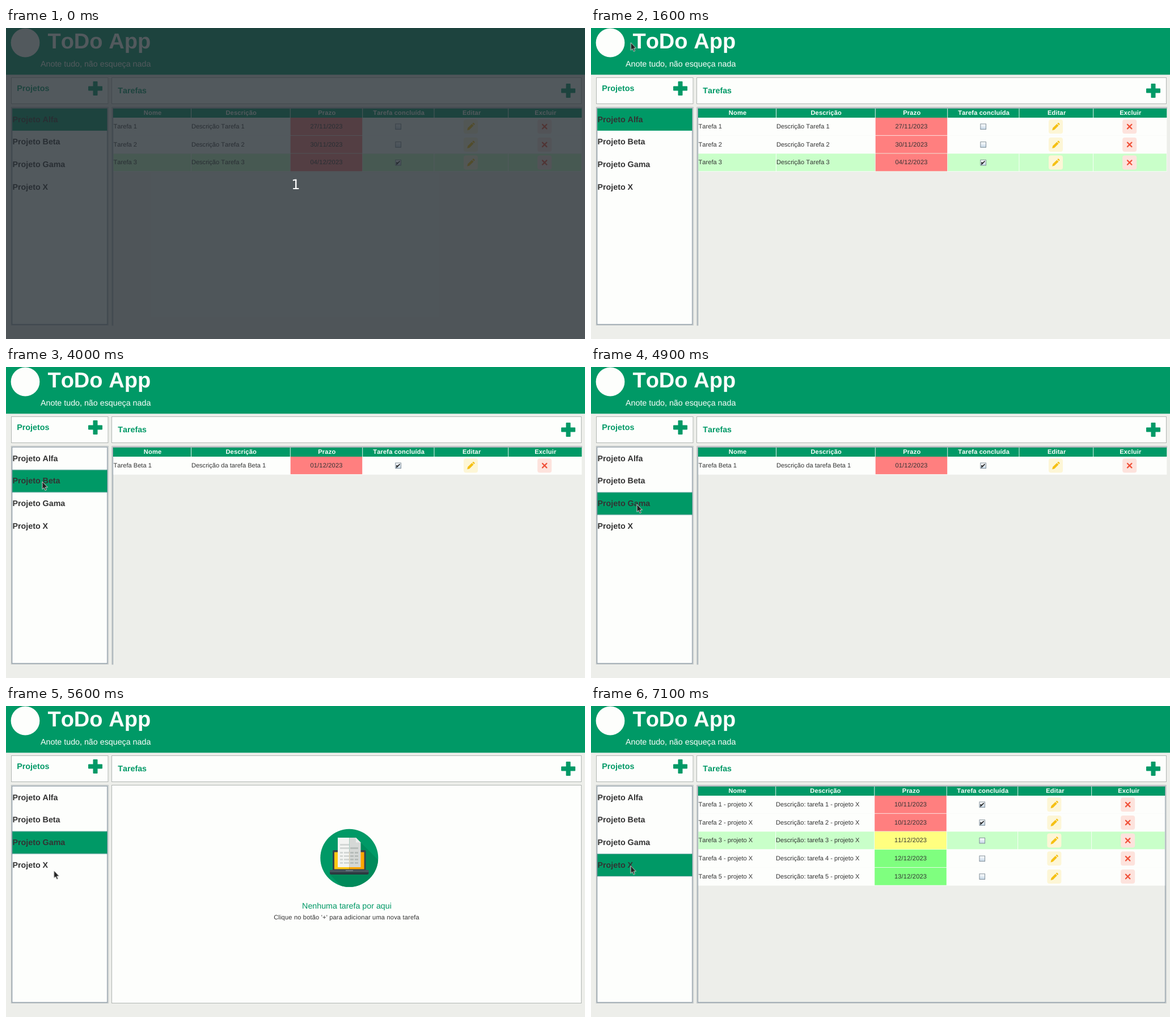
Write an HTML page that moves like this. It is 1021x548 px and loops after 8 s.

```html
<!DOCTYPE html>
<html lang="pt">
<head>
<meta charset="utf-8">
<title>Lista de tarefas</title>
<style>
  html, body { margin: 0; width: 100%; height: 100%; overflow: hidden; background: #edeeea; }
  svg { display: block; width: 1021px; height: 548px; }
  text {
    font-family: "Liberation Sans", Arial, sans-serif;
    font-size: 11.1px; fill: #333;
    font-kerning: none; text-rendering: geometricPrecision;
  }
  .big { font-size: 14.27px; }
  .bold { font-weight: bold; }
  .mid { text-anchor: middle; }
  .wide { letter-spacing: .17px; }
  .green { fill: #009966; }
  .white { fill: #fdfefc; }
  .panel { fill: #fdfefc; stroke: #b1b6b3; }
  .outer { fill: none; stroke: #b9bfc0; }
  .inner { fill: none; stroke: #7a8a99; }

  .scene, #veil, #cursor, #selection { animation: 8s step-end infinite; }
  #alfa { animation-name: alfa; }
  #beta { animation-name: beta; }
  #empty { animation-name: empty; }
  #xis { animation-name: xis; }
  #veil { animation-name: veil; }
  #selection { animation-name: select; }
  #cursor { animation-name: point; }

  @keyframes alfa { 0% { visibility: visible } 40%, 100% { visibility: hidden } }
  @keyframes beta { 0% { visibility: hidden } 40% { visibility: visible } 62.5%, 100% { visibility: hidden } }
  @keyframes empty { 0% { visibility: hidden } 62.5% { visibility: visible } 88.75%, 100% { visibility: hidden } }
  @keyframes xis { 0% { visibility: hidden } 88.75%, 100% { visibility: visible } }
  @keyframes veil { 0% { visibility: visible } 1.25%, 100% { visibility: hidden } }
  @keyframes select {
    0% { transform: translateY(0); stroke: none }
    38.75% { transform: translateY(39.65px); stroke: #3c8b86 }
    61.25% { transform: translateY(79.3px); stroke: #3c8b86 }
    87.5%, 100% { transform: translateY(118.95px); stroke: #3c8b86 }
  }
  /* The pointer advances once every 100 ms */
  @keyframes point {
    0% { transform: translate(74px, -30px) }
    18.75% { transform: translate(74px, 1px); animation-timing-function: steps(4) }
    23.75% { transform: translate(59px, 100px); animation-timing-function: steps(2) }
    26.25% { transform: translate(50px, 160px); animation-timing-function: steps(2) }
    28.75% { transform: translate(53px, 187px); animation-timing-function: steps(5) }
    35%, 48.75% { transform: translate(63px, 200px) }
    50% { transform: translate(64px, 202px); animation-timing-function: steps(4) }
    55% { transform: translate(81px, 242px) }
    62.5% { transform: translate(81px, 242px); animation-timing-function: steps(6) }
    70%, 72.5% { transform: translate(84.5px, 290px) }
    73.75% { transform: translate(71px, 285px) }
    80% { transform: translate(71px, 285px); animation-timing-function: steps(2) }
    82.5%, 100% { transform: translate(70px, 281.5px) }
  }
</style>
</head>
<body>
<svg viewBox="0 0 1021 548">
  <defs>
    <linearGradient id="boxFill" x2="0" y2="1">
      <stop offset="0" stop-color="#fff"/><stop offset="1" stop-color="#c4d6e6"/>
    </linearGradient>
    <clipPath id="disc"><circle cx="605.3" cy="267.8" r="51"/></clipPath>
    <path id="plus" class="green" d="M-3 -12.5h6q1 0 1 1v7.5h7.5q1 0 1 1v6q0 1 -1 1h-7.5v7.5q0 1 -1 1h-6q-1 0 -1 -1v-7.5h-7.5q-1 0 -1 -1v-6q0 -1 1 -1h7.5v-7.5q0 -1 1 -1z"/>
    <rect id="box" x="-4.9" y="-4.7" width="9.6" height="9.6" fill="url(#boxFill)" stroke="#75848f" stroke-width=".9"/>
    <path id="tick" d="M-2.6 -.8V2.6L2.8 -2.6" fill="none" stroke="#222" stroke-width="1.7"/>
    <g id="edit">
      <rect x="-12.5" y="-12.5" width="25" height="25" rx="4" fill="#fdf6d6"/>
      <path d="M-6.3 6.6l1 -4.2L2 -4.7L5 -1.7L-2.2 5.5zM2.8 -5.5l1 -1q.7 -.6 1.4 0l1.6 1.6q.6 .7 0 1.4l-1 1z" fill="#f5c014"/>
    </g>
    <g id="drop">
      <rect x="-12.5" y="-12.5" width="25" height="25" rx="4" fill="#fde3dd"/>
      <path d="M-3.7 -3.7L3.7 3.7M3.7 -3.7L-3.7 3.7" stroke="#f0523a" stroke-width="2.3" stroke-linecap="round"/>
    </g>
  </defs>

  <rect width="1021" height="548" fill="#edeeea"/>
  <rect width="1021" height="82.3" class="green"/>
  <circle cx="34" cy="26" r="25.4" class="white"/>
  <text x="73.4" y="36" class="bold white" style="font-size:38.06px">ToDo App</text>
  <text x="61" y="68" class="big white">Anote tudo, não esqueça nada</text>

  <rect x="9.5" y="87.5" width="170.5" height="46" class="panel"/>
  <rect x="186.5" y="87.5" width="828" height="46" class="panel"/>
  <text x="19.3" y="111" class="big bold green">Projetos</text>
  <text x="197.3" y="115" class="big bold green">Tarefas</text>
  <use href="#plus" x="157.5" y="106.5"/>
  <use href="#plus" x="991.5" y="110.5"/>

  <rect x="9.3" y="139.5" width="171" height="384" class="outer"/>
  <rect x="10.7" y="141.2" width="168" height="381" class="inner white" style="fill:#fdfefc"/>
  <rect id="selection" x="11.2" y="141.9" width="167.2" height="39" class="green" stroke-width=".8"/>
  <g id="projects"></g>

  <g id="alfa" class="scene"></g>
  <g id="beta" class="scene"></g>
  <g id="xis" class="scene"></g>
  <g id="empty" class="scene">
    <rect x="186.5" y="139.5" width="828" height="384" class="panel"/>
    <circle cx="605.3" cy="267.8" r="51" class="green"/>
    <path clip-path="url(#disc)" d="M625 240L665 280V330H604L571 297z" fill="#008a5a"/>
    <path d="M576 256q0 -2 2 -2h54.500q2 0 2 2v34h-58.500z" fill="#35424b"/>
    <path d="M579 257.500h26.300v30h-26.300z" fill="#ffc714"/>
    <path d="M605.300 257.500h26.300v30h-26.300z" fill="#fba600"/>
    <path d="M585 232h20.300v52h-20.300z" fill="#f3f4f2"/>
    <path d="M605.300 232h11.700l8.500 8.500v43.500h-20.200z" fill="#d5d8d6"/>
    <path d="M617 232l8.500 8.500h-8.500z" fill="#eceeec"/>
    <path d="M589 244.500h16M589 250.500h16M589 258.500h5M596 258.500h9M589 264.500h5M596 264.500h9M589 270.500h5M596 270.500h9M589 276.500h5M596 276.500h9" stroke="#d3d7d5" stroke-width="3"/>
    <path d="M607 250.500h14M607 258.500h6M615 258.500h6M607 264.500h6M615 264.500h6M607 270.500h6M615 270.500h6M607 276.500h6M615 276.500h6" stroke="#b6bcb9" stroke-width="3"/>
    <path d="M571 289h68.500v5q0 3 -3 3h-62.500q-3 0 -3 -3z" fill="#45545d"/>
    <path d="M571 293h68.500v1q0 3 -3 3h-62.500q-3 0 -3 -3z" fill="#2c3940"/>
    <path d="M599 289h13v2h-13z" fill="#6c7a82"/>
    <text x="601" y="357" class="big mid green">Nenhuma tarefa por aqui</text>
    <text x="600.5" y="376" class="mid wide">Clique no botão '+' para adicionar uma nova tarefa</text>
  </g>

  <path id="cursor" d="M0 0V13.400L3 10.700L5.100 15.600L7.300 14.600L5.300 9.900H9.400z" fill="#222" stroke="#f4f5f3" stroke-width=".8"/>

  <g id="veil">
    <rect width="1021" height="548" fill="rgba(37,45,51,.79)"/>
    <text x="511" y="283.500" class="mid" style="font:24px 'DejaVu Sans',sans-serif;fill:#fff">1</text>
  </g>
</svg>
<script>
  const ROW = 31.7, TOP = 158;
  const RED = '#ff7f7f', YELLOW = '#ffff7f', LIME = '#7fff7f';
  const headings = ['Nome', 'Descrição', 'Prazo', 'Tarefa concluída', 'Editar', 'Excluir'];
  const byId = id => document.getElementById(id);
  const text = (x, y, cls, s) => `<text x="${x}" y="${y}" class="${cls}">${s}</text>`;
  const rect = (x, y, w, h, fill) => `<rect x="${x}" y="${y}" width="${w}" height="${h}" fill="${fill}"/>`;
  const use = (id, x, y) => `<use href="#${id}" x="${x}" y="${y}"/>`;

  byId('projects').innerHTML = ['Alfa', 'Beta', 'Gama', 'X']
    .map((name, i) => text(11.5, 165.7 + i * 39.65, 'big bold', 'Projeto ' + name)).join('');

  function drawRow([name, description, date, color, done], i, edges, mids) {
    const y = TOP + i * ROW, middle = y + 15.7, base = y + 19;
    return rect(189, y, edges[6] - 189, ROW, '#fdfefc') +
      (i === 2 ? edges.slice(0, 6).map((x, c) =>
        rect(x + .4, y, edges[c + 1] - x - .9, ROW - .8, '#c9ffc9')).join('') : '') +
      rect(edges[2] + .4, y, edges[3] - edges[2] - .9, ROW - .8, color) +
      text(189.6, base, '', name) +
      text(edges[1] + .4, base, '', description) +
      text(mids[2], base, 'mid wide', date) +
      use('box', mids[3] - .1, middle) + (done ? use('tick', mids[3] - .1, middle) : '') +
      use('edit', mids[4] - .8, middle) +
      use('drop', mids[5] - .8, middle);
  }

  function drawTable(id, edges, rows, framed) {
    const mids = headings.map((_, c) => (edges[c] + edges[c + 1]) / 2);
    const frame = framed
      ? '<rect x="186.7" y="139.5" width="827.5" height="384" class="outer"/><rect x="188.3" y="141.2" width="824.4" height="381" class="inner"/>'
      : '<path d="M1016 139.500H186.700V524.500" class="outer"/><path d="M1016 141.200H188.300V524.500" class="inner"/>';
    byId(id).innerHTML = frame +
      rect(189, 142, edges[6] - 189, 16, '#009966') +
      edges.slice(1, 6).map(x => rect(x - .5, 142, 1, 16, '#e4f3ec')).join('') +
      headings.map((s, c) => text(mids[c] + .8, 153, 'bold mid wide white', s)).join('') +
      rows.map((row, i) => drawRow(row, i, edges, mids)).join('');
  }

  const wideEdges = [189, 326.5, 501.3, 628.7, 755, 885.7, 1015.3];
  const framedEdges = [189, 325.7, 499.8, 627.3, 752.7, 882.7, 1012.2];

  drawTable('alfa', wideEdges, ['27/11/2023', '30/11/2023', '04/12/2023'].map((date, i) =>
    [`Tarefa ${i + 1}`, `Descrição Tarefa ${i + 1}`, date, RED, i === 2]));
  drawTable('beta', wideEdges,
    [['Tarefa Beta 1', 'Descrição da tarefa Beta 1', '01/12/2023', RED, true]]);
  drawTable('xis', framedEdges, [RED, RED, YELLOW, LIME, LIME].map((color, i) =>
    [`Tarefa ${i + 1} - projeto X`, `Descrição: tarefa ${i + 1} - projeto X`,
      `${i ? 9 + i : 10}/${i ? 12 : 11}/2023`, color, i < 2]), true);
</script>
</body>
</html>
```
